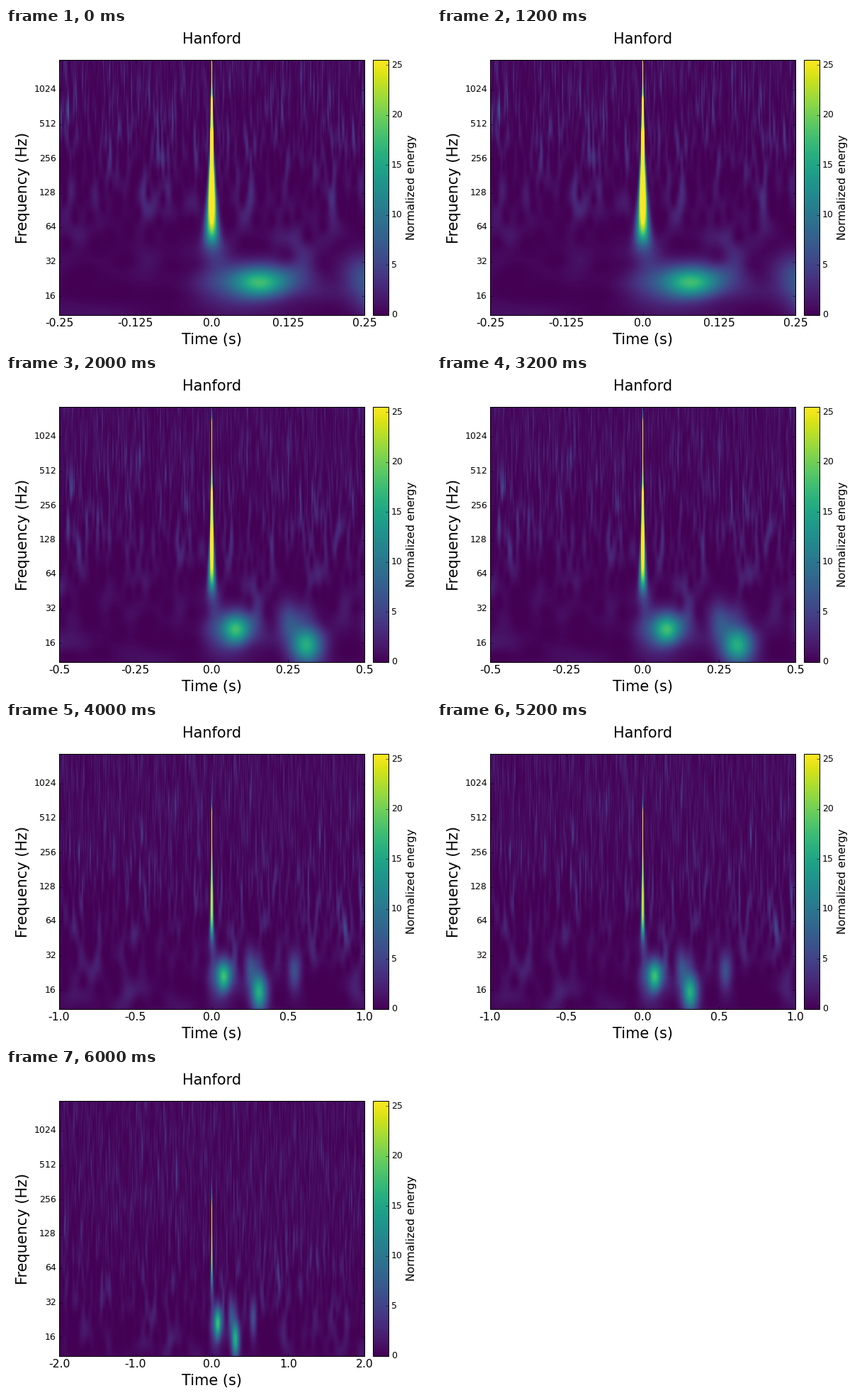
Animation of 600 by 450 pixels, one loop 8000 ms. Source, as a matplotlib script:

```python
import numpy as np
import matplotlib.pyplot as plt
from matplotlib.animation import FuncAnimation

WIDTH, HEIGHT, DPI = 600, 450, 75
ROWS, COLS = 360, 600
V_MAX = 25.5
OCTAVE_PX = 48.5
LOW = 4 - 27 / OCTAVE_PX
HIGH = LOW + ROWS / OCTAVE_PX
SPANS = (0.25, 0.5, 1.0, 2.0)      # half widths of the time window, seconds
RATE, SAMPLES = 8192, 36000

# Slow bursts: time, octave, energy, time width, octave width
BURSTS = (
    (0.078, 4.40, 17.0, 0.035, 0.34),
    (0.010, 4.40, 3.0, 0.030, 0.35),
    (0.310, 3.94, 16.0, 0.036, 0.38),
    (0.250, 4.65, 5.5, 0.026, 0.42),
    (0.540, 4.55, 6.0, 0.028, 0.40),
)

plt.rcParams.update({"font.family": "DejaVu Sans", "axes.linewidth": 1.0})

octaves = LOW + (np.arange(ROWS) + 0.5) / OCTAVE_PX
freqs = 2.0 ** octaves
columns = (np.arange(COLS) + 0.5) / COLS * 2 - 1


def burst(times, t0, u0, energy, t_width, u_width):
    """Gaussian in octaves times Gaussian in time."""
    rise = np.exp(-0.5 * ((octaves - u0) / u_width) ** 2)
    pulse = np.exp(-0.5 * ((times - t0) / t_width) ** 2)
    return energy * rise[:, None] * pulse


def spike(times):
    """Click at time zero: energy grows with frequency, duration shrinks."""
    peak = 0.375 * freqs / (1 + (46 / freqs) ** 8)
    return peak[:, None] * np.exp(-(times * freqs[:, None] / 0.66) ** 2)


def noise_maps():
    """Constant-Q energy of one noise series, sampled for every time window."""
    rng = np.random.default_rng(14)
    spectrum = rng.normal(size=SAMPLES) + 1j * rng.normal(size=SAMPLES)
    nu = np.arange(SAMPLES) * RATE / SAMPLES
    gain = np.interp(octaves, (4, 8), (0.5, 0.85))
    picks = [np.round((columns * s + 2.1) * RATE).astype(int) for s in SPANS]
    maps = np.empty((len(SPANS), ROWS, COLS))
    for row, f in enumerate(freqs):
        window = np.exp(-0.5 * ((nu - f) / (0.24 * f)) ** 2)
        energy = np.abs(np.fft.ifft(spectrum * window)) ** 2
        energy *= gain[row] / energy.mean()
        for k, pick in enumerate(picks):
            maps[k, row] = np.convolve(energy[pick], (0.25, 0.5, 0.25), "same")
    return maps


def energy_map(span, noise):
    times = columns * span
    return noise + spike(times) + sum(burst(times, *b) for b in BURSTS)


maps = [energy_map(s, n) for s, n in zip(SPANS, noise_maps())]

fig = plt.figure(figsize=(WIDTH / DPI, HEIGHT / DPI), dpi=DPI, facecolor="white")


def pixel_axes(left, top, width, height):
    return fig.add_axes((left / WIDTH, 1 - (top + height) / HEIGHT,
                         width / WIDTH, height / HEIGHT))


def label(x, y, text, size, rotation=0):
    """Horizontal text sits on baseline y; turned text ends at x."""
    ha, va = ("right", "center") if rotation else ("center", "baseline")
    fig.text(x / WIDTH, 1 - y / HEIGHT, text, size=size, rotation=rotation,
             ha=ha, va=va)


def style_ticks(axes, **sides):
    axes.tick_params(direction="in", length=4, width=0.5, pad=4,
                     labelsize=12, **sides)
    plt.setp(axes.get_yticklabels(), va="center")


ax = pixel_axes(75, 45, 431, 360)
image = ax.imshow(maps[0], cmap="viridis", vmin=0, vmax=V_MAX, origin="lower",
                  aspect="auto", interpolation="nearest",
                  extent=(-1, 1, LOW, HIGH))
ticks = np.linspace(-1, 1, 5)
ax.set_xticks(ticks)
ax.set_yticks(range(4, 11), [str(2 ** n) for n in range(4, 11)])
style_ticks(ax, top=True, right=True)
ax.tick_params(axis="x", labelsize=15)

bar = fig.colorbar(image, cax=pixel_axes(518.47, 45, 21.53, 360),
                   ticks=range(0, 26, 5))
style_ticks(bar.ax)
bar.outline.set_linewidth(1.0)

label(290.3, 22, "Hanford", 20)
label(290.3, 446, "Time (s)", 20)
label(34, 225, "Frequency (Hz)", 20, rotation=90)
label(580.5, 225, "Normalized energy", 15, rotation=90)


def update(frame):
    image.set_data(maps[frame])
    ax.set_xticklabels([str(float(x * SPANS[frame])) for x in ticks])
    return [image]


anim = FuncAnimation(fig, update, frames=len(SPANS), interval=2000,
                     repeat=True, repeat_delay=0, blit=False)
plt.show()
```
